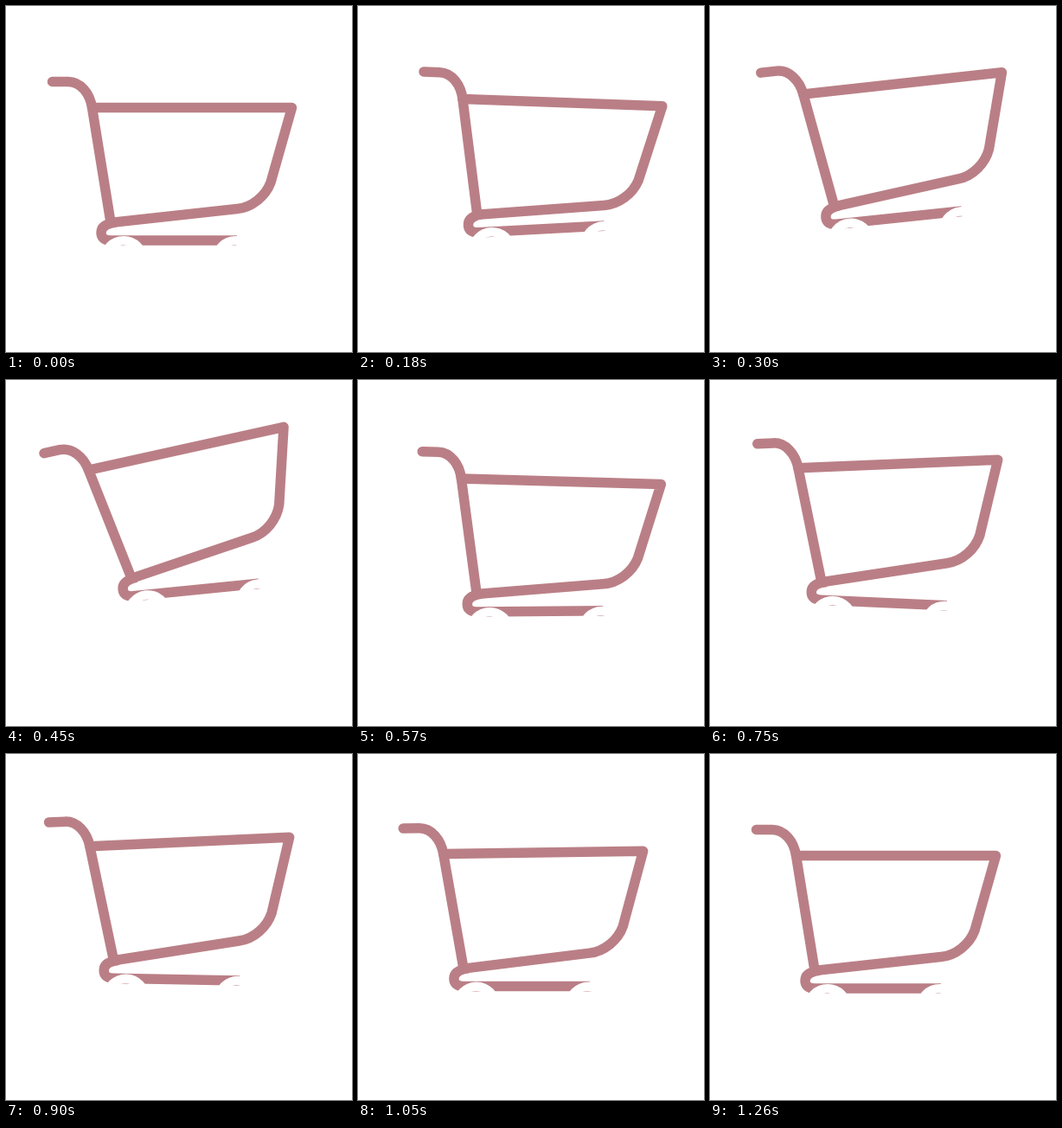
An HTML page that plays this animation: 400 px wide and 400 px high, repeating every 3.29 s.

```html
<!DOCTYPE html>
<html lang="en">
<head>
<meta charset="utf-8">
<title>Shopping cart</title>
<style>
  html, body { margin: 0; width: 100%; height: 100%; overflow: hidden; background: #fff; }
  svg { display: block; width: 100%; height: 100%; }
  .line { fill: none; stroke: #ba7f86; stroke-width: 11.5; stroke-linejoin: round; }
  .gap { fill: #fff; }
  .wheel { fill: #ba7f86; }
  #basket { stroke-linecap: round; }
</style>
</head>
<body>
<svg viewBox="0 0 400 400">
  <defs>
    <clipPath id="floor"><rect x="90" y="230" width="200" height="47"/></clipPath>
  </defs>
  <g id="cart">
    <g id="base">
      <path class="line" d="M127 250 C116 251.5 110 255 110 262 C110 268 114 271 121 271 H267"/>
      <circle class="gap" cx="136" cy="293.5" r="27.5"/>
      <circle class="gap" cx="265.5" cy="293.5" r="27.5"/>
      <g class="wheel" clip-path="url(#floor)">
        <circle cx="135.5" cy="293.5" r="17"/>
        <circle cx="264" cy="293.5" r="17"/>
      </g>
    </g>
    <g id="basket" class="line">
      <path d="M53.5 87.5 H72 C86 87.5 97 101 99.5 117.5 L120.5 247"/>
      <path d="M99.5 117.5 H330.5 L306 204 C300 220 284 233 267 234.5 L121 250.5"/>
    </g>
  </g>
</svg>
<script>
  const LOOP = 3290, MOVE = 1260, STEP = 30;
  const PIVOT = "121 249";
  const PUSH = 440, REACH = 24.5;

  const [cart, base, basket] = ["cart", "base", "basket"].map(id => document.getElementById(id));

  // Eases from one turning point [time, value] to the next, starting at rest
  function swing(t, ...turns) {
    let t0 = 0, v0 = 0;
    for (const [t1, v1] of turns) {
      if (t < t1) {
        const u = (t - t0) / (t1 - t0);
        return v0 + (v1 - v0) * u * u * (3 - 2 * u);
      }
      t0 = t1;
      v0 = v1;
    }
    return v0;
  }

  // Quick push to the right, then a slowing roll back
  function roll(t) {
    return t < PUSH
      ? REACH * (1 - (1 - t / PUSH) ** 2.2)
      : REACH * ((MOVE - t) / (MOVE - PUSH)) ** 2.4;
  }

  const hop = t => swing(t, [415, -23], [615, 0], [760, -17], [1140, 0]);
  const tilt = t => swing(t, [155, 2.4], [425, -13.2], [635, 6], [780, -3.4], [1170, 0]);
  const lift = t => swing(t, [385, -6.8], [690, 2.8], [1050, 0]);

  function turn(node, angle) {
    node.setAttribute("transform", `rotate(${angle} ${PIVOT})`);
  }

  function draw(now) {
    const t = Math.min(MOVE, Math.floor((now % LOOP) / STEP) * STEP);
    cart.setAttribute("transform", `translate(${roll(t)} ${hop(t)})`);
    turn(basket, tilt(t));
    turn(base, lift(t));
  }

  const start = performance.now();
  function tick() {
    draw(performance.now() - start);
    requestAnimationFrame(tick);
  }
  tick();
</script>
</body>
</html>
```
